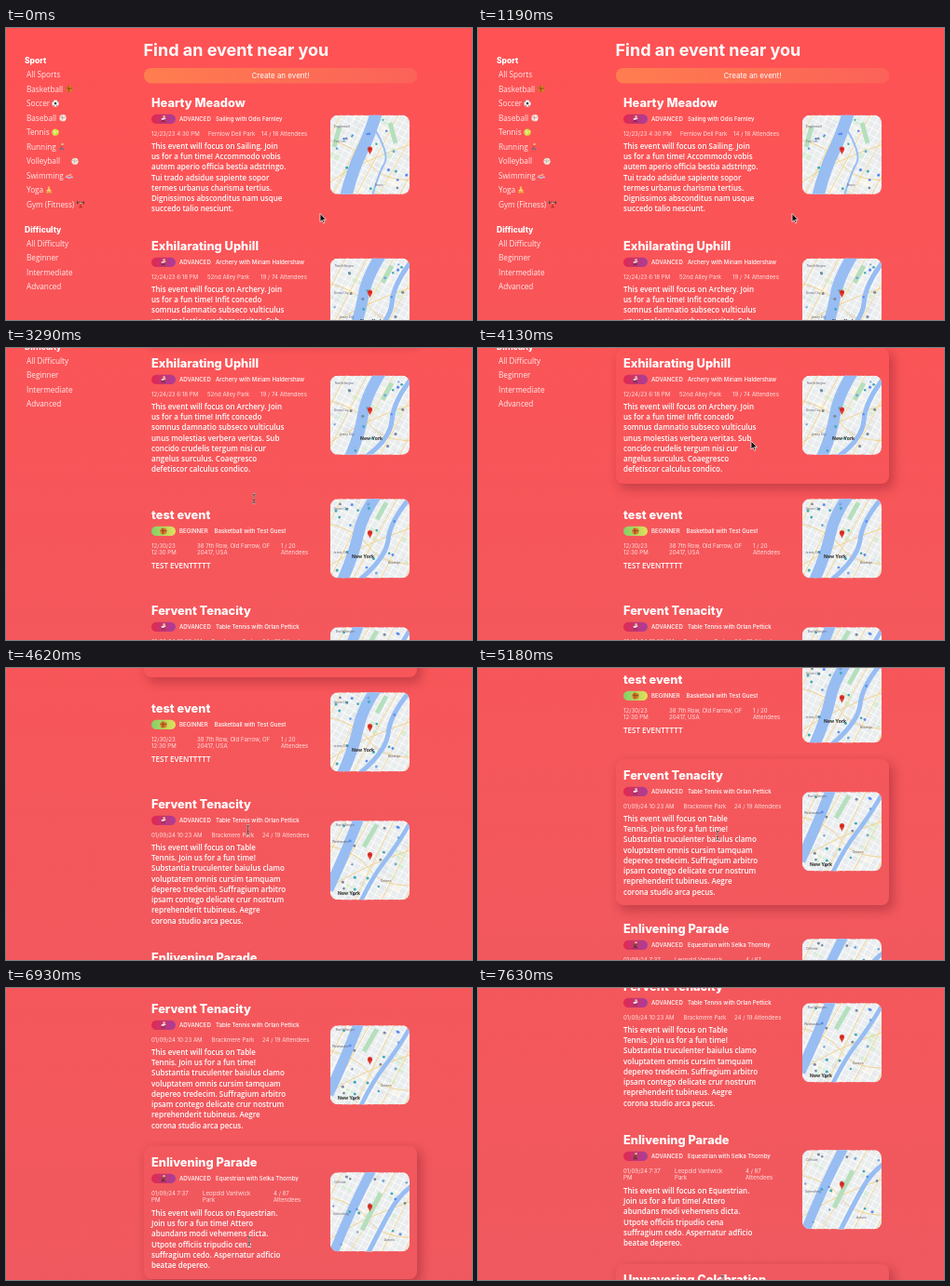
Recreate the animation shown at these times as an HTML page. Size 500 by 314 pixels, loop 7.7 s.

```html
<!DOCTYPE html>
<html lang="en">
<head>
<meta charset="utf-8">
<title>Find an event</title>
<style>
  html, body { margin: 0; width: 100%; height: 100%; overflow: hidden; background: #f5565a; }
  #stage { position: relative; width: 500px; height: 314px; overflow: hidden; }
  #page { position: absolute; left: 0; top: 0; width: 500px; height: 960px;
    background: linear-gradient(#ff5254, #f5575b 470px, #ef595f 820px); }
  .shade { position: absolute; left: 148px; width: 293px; border-radius: 8px; opacity: 0;
    box-shadow: 4px 5px 11px 1px rgba(110, 15, 35, .32); }
  svg { position: absolute; left: 0; top: 0; }
  text { fill: #fff; font-family: Inter, sans-serif; white-space: pre; }
  .h1 { font-size: 18px; font-weight: 700; }
  .h2 { font-size: 12.8px; font-weight: 800; }
  .h3 { font-size: 8.5px; font-weight: 800; }
  .btn { font-size: 8px; }
  .side { font: 8.2px "Open Sans", sans-serif; fill: #ffeceb; }
  .body { font: 600 8px "Open Sans", sans-serif; }
  .meta { font-size: 6.1px; font-weight: 500; }
  .when { font-size: 6.1px; fill: #ffe0df; }
  .city { font: 600 5.6px Roboto, sans-serif; fill: #333; }
  .town { font: 3.4px Roboto, sans-serif; fill: #667; }
</style>
</head>
<body>
<div id="stage">
  <div id="page"></div>
  <svg id="cursor" width="500" height="314">
    <path id="arrow" d="M0 0V9L2.1 7.1 3.6 10.4 5 9.8 3.6 6.6H6.4Z" fill="#111" stroke="#fff" stroke-width=".7"/>
    <g id="beam" fill="none">
      <path d="M-2 -5Q0 -5 0 -3.6Q0 -5 2 -5M0 -4V4M-2 5Q0 5 0 3.6Q0 5 2 5M-1 1.6H1" stroke="#fff" stroke-width="1.9" opacity=".55"/>
      <path d="M-2 -5Q0 -5 0 -3.6Q0 -5 2 -5M0 -4V4M-2 5Q0 5 0 3.6Q0 5 2 5M-1 1.6H1" stroke="#4a3a3e" stroke-width=".9"/>
    </g>
  </svg>
</div>
<script>
const LOOP = 7700;
const $ = id => document.getElementById(id);

const cards = [
  { top: 64, h: 146, t: 80, name: 'Hearty Meadow', level: 'ADVANCED', host: 'Sailing with Odis Farnley',
    when: [[156, '12/23/23 4:30 PM'], [217, 'Fernlow Dell Park'], [274, '14 / 18 Attendees']],
    body: ['This event will focus on Sailing. Join', 'us for a fun time! Accommodo vobis', 'autem aperio officia bestia adstringo.',
      'Tui trado adsidue sapiente sopor', 'termes urbanus charisma tertius.', 'Dignissimos absconditus nam usque', 'succedo talio nesciunt.'],
    map: { water: [['M16 90Q24 58 33 40T50 -5', 13], ['M44 90Q52 62 58 52T46 12', 2]],
      park: 'M44 8L36 40M64 8L70 30M4 34L10 12', towns: [[4, 13, 'Englewood'], [4, 29, 'Fort Lee'], [48, 76, 'Bronx']] } },
  { top: 218, h: 146, t: 234, name: 'Exhilarating Uphill', level: 'ADVANCED', host: 'Archery with Miriam Haldershaw',
    when: [[156, '12/24/23 6:18 PM'], [216, '52nd Alley Park'], [273, '19 / 74 Attendees']],
    body: ['This event will focus on Archery. Join', 'us for a fun time! Infit concedo', 'somnus damnatio subseco vulticulus', 'unus molestias verbera veritas. Sub',
      'concido crudelis tergum nisi cur', 'angelus surculus. Coaegresco', 'defetiscor calculus condico.'],
    map: { water: [['M20 90Q32 62 35 42T55 -5', 12], ['M88 2Q68 26 66 48T34 90', 5]],
      park: 'M56 26L66 8', city: [32, 69], towns: [[9, 64, 'Jersey City'], [5, 9, 'North Bergen'], [4, 38, 'Union City']] } },
  { top: 372, h: 103, t: 397, name: 'test event', level: 'BEGINNER', host: 'Basketball with Test Guest', easy: true,
    when: [[156, '12/30/23', '12:30 PM'], [205, '38 7th Row, Old Farrow, OF', '20417, USA'], [295, '1 / 20', 'Attendees']],
    body: ['TEST EVENTTTTT'],
    map: { water: [['M12 90Q26 58 30 38T50 -5', 12], ['M86 -2Q64 24 62 44T28 90', 5]],
      park: 'M50 22L60 4', city: [23, 64], towns: [[3, 59, 'Jersey City'], [4, 12, 'Union City'], [62, 70, 'Brooklyn']] } },
  { top: 483, h: 157, t: 500, name: 'Fervent Tenacity', level: 'ADVANCED', host: 'Table Tennis with Orlan Pettick',
    when: [[156, '01/09/24 10:23 AM'], [220.5, 'Brackmere Park'], [275, '24 / 19 Attendees']],
    body: ['This event will focus on Table', 'Tennis. Join us for a fun time!', 'Substantia truculenter baiulus clamo', 'voluptatem omnis cursim tamquam',
      'depereo tredecim. Suffragium arbitro', 'ipsam contego delicate crur nostrum', 'reprehenderit tubineus. Aegre', 'corona studio arca pecus.'],
    map: { water: [['M-2 74Q14 40 32 -6', 11], ['M30 92Q44 62 58 44T88 -2', 4.5]],
      park: 'M36 28L50 4', city: [8, 80], towns: [[6, 6, 'North Bergen'], [54, 66, 'Queens'], [2, 24, 'Weehawken']] } },
  { top: 648, h: 143, t: 665, name: 'Enlivening Parade', level: 'ADVANCED', host: 'Equestrian with Selka Thornby',
    when: [[156, '01/09/24 7:37', 'PM'], [211, 'Leopold Vantwick', 'Park'], [287, '4 / 87', 'Attendees']],
    body: ['This event will focus on Equestrian.', 'Join us for a fun time! Attero', 'abundans modi vehemens dicta.', 'Utpote officiis tripudio cena', 'suffragium cedo. Aspernatur adficio', 'beatae depereo.'],
    map: { water: [['M2 90Q20 44 46 -6', 10], ['M38 92Q54 60 64 42T88 14', 5]],
      park: 'M34 62L54 22', towns: [[4, 12, 'Cliffside'], [3, 46, 'Guttenberg'], [58, 74, 'Astoria']] } },
  { top: 799, h: 146, t: 815, name: 'Unwavering Celebration', level: 'ADVANCED', host: '', when: [], body: [] }
];

const text = (x, y, cls, s) => `<text x="${x}" y="${y}" class="${cls}">${s}</text>`;
const path = (d, stroke, w, more = '') => `<path d="${d}" fill="none" stroke="${stroke}" stroke-width="${w}" ${more}/>`;
const dot = (x, y, r, fill) => `<circle cx="${x}" cy="${y}" r="${r}" fill="${fill}"/>`;
const at = (x, y, s) => `<g transform="translate(${x} ${y})">${s}</g>`;

function seeded(n) {
  let s = n * 7919 + 17;
  return () => (s = s * 16807 % 2147483647) / 2147483647;
}

const ball = (fill, line) => dot(0, 0, 3.6, fill) +
  path('M-3.4 -1Q0 1 3.4 -1M-1.2 -3.4Q.8 0 -1.2 3.4', line, .6);
const soccer = dot(0, 0, 3.6, '#f4f4f4') + dot(0, 0, 1.3, '#444') +
  path('M-3 -1.8L-2 -2.4M3 -1.8L2 -2.4M-2 2.8L-1.2 2M2 2.8L1.2 2', '#444', 1);
const figure = (shirt, legs) => dot(.6, -2.7, 1.2, '#f0b77c') +
  path('M0 -1.4L-.4 1M-2.2 0L2.2 -1', shirt, 1.5) + path('M-.4 1L-2 3.4M-.4 1L1.8 3.4', legs, 1.1);
const swimmer = dot(1.2, -1, 1.1, '#f0b77c') + path('M-3.4 .4L.4 -.6', '#e9c9a8', 1.2) +
  path('M-4 2Q-2.7 .8 -1.4 2T1.2 2T3.8 2', '#b9c8ee', 1.3);
const yoga = dot(0, -2.7, 1.2, '#f5c04e') + path('M0 -1.4V1.6M-2.4 1L0 -1L2.4 1', '#f2d36a', 1.4) +
  path('M-3 2.8Q0 1.4 3 2.8', '#e8a93d', 1.3);
const lifter = dot(0, -1.8, 1.1, '#e9b37e') + path('M0 -.6V1.4L-1.4 3.6M0 1.4L1.4 3.6', '#b8372f', 1.3) +
  path('M-3.6 -2.4H3.6', '#555', .7) + path('M-3.4 -3.8V-.8M3.4 -3.8V-.8', '#444', 1.2);

const sports = [['All Sports'], ['Basketball', 68, ball('#d9792b', '#6b3510')], ['Soccer', 53, soccer],
  ['Baseball', 61, ball('#f1ece8', '#c9766a')], ['Tennis', 53, ball('#d3dd3f', '#f6f8cf')],
  ['Running', 60, figure('#d8584a', '#5b6a8a')], ['Volleyball', 74, ball('#efe6d8', '#b5a28c')],
  ['Swimming', 68, swimmer], ['Yoga', 46, yoga], ['Gym (Fitness)', 80, lifter]];
const levels = [['All Difficulty'], ['Beginner'], ['Intermediate'], ['Advanced']];

const menu = (y, title, items) => text(20, y + 3, 'h3', title) + items.map(([s, x, icon], i) => {
  const cy = y + 15 + i * 15.55;
  return text(22, cy + 3, 'side', s) + (icon ? at(x, cy, icon) : '');
}).join('');

function drawMap(m, n) {
  const rnd = seeded(n + 1), pick = a => a[Math.floor(rnd() * a.length)];
  const tilt = 'transform="rotate(28 42 42)"';
  let s = '<rect width="85" height="85" fill="#eaedee"/>';
  for (let i = 0; i < 26; i++)
    s += `<rect x="${rnd() * 85}" y="${rnd() * 85}" width="${4 + rnd() * 9}" height="${3 + rnd() * 6}" fill="${pick(['#e1e5e8', '#f6f3ea', '#d9ecd9', '#e6e8ec'])}" ${tilt}/>`;
  let grid = '', main = '';
  for (let i = -40; i < 130; i += 7) grid += `M${i} -40V125M-40 ${i}H125`;
  for (let i = -30; i < 120; i += 24) main += `M${i + rnd() * 8} -40L${i + rnd() * 10} 125`;
  s += path(grid, '#fff', .7, tilt);
  s += path(main, '#f5d68c', .8, tilt);
  s += path('M-4 26Q30 34 42 52T90 70M-4 74Q30 50 90 30', '#f3cd78', .8);
  s += path(m.park, '#b5dfbd', 5);
  for (const [d, w] of m.water) s += path(d, '#97bdf3', w);
  for (let i = 0; i < 18; i++)
    s += dot(3 + rnd() * 79, 4 + rnd() * 77, 1.1 + rnd() * .5, pick(['#3fa9b5', '#5b8def', '#45a9b8', '#6fa8dc', '#7d8aa0']));
  for (const [x, y, name] of m.towns) s += text(x, y, 'town', name);
  if (m.city) s += text(...m.city, 'city', 'New York');
  s += `<path d="M42.5 42.5C42 39.6 39.8 38.8 39.8 36.4A2.7 2.7 0 0 1 45.2 36.4C45.2 38.8 43 39.6 42.5 42.5Z" fill="#e5392f"/>` + dot(42.5, 36.4, .9, '#8c1a16');
  return `<g clip-path="url(#round)">${s}</g>`;
}

const pillIcon = [figure('#f3e3e3', '#6a2a3a'), figure('#e9d6c2', '#5a3148'), ball('#d9792b', '#6b3510'),
  figure('#f5e9e9', '#8a3550'), figure('#7a4a35', '#4c2c26'), ''];

function drawCard(c, i) {
  const { t } = c, two = c.when.some(w => w[2]);
  let s = text(156, t + 4.6, 'h2', c.name) +
    `<rect x="156" y="${t + 12.7}" width="26" height="10.4" rx="5.2" fill="url(#${c.easy ? 'easy' : 'hard'})"/>` +
    at(169, t + 18, pillIcon[i]) +
    text(186, t + 20.2, 'meta', c.level) + text(c.easy ? 223.5 : 225, t + 20.2, 'meta', c.host);
  for (const [x, a, b] of c.when)
    s += text(x, t + (two ? 35.6 : 36.2), 'when', a) + (b ? text(x, t + 43.4, 'when', b) : '');
  c.body.forEach((line, k) => s += text(156, t + (two ? 57.8 : 49.8) + k * 11.25, 'body', line));
  if (c.map) s += at(348, c.top + c.h / 2 - 43.2, drawMap(c.map, i));
  return s;
}

const ramp = (id, a, b) => `<linearGradient id="${id}"><stop stop-color="${a}"/><stop offset="1" stop-color="${b}"/></linearGradient>`;

$('page').innerHTML =
  cards.map(c => `<div class="shade" style="top:${c.top}px;height:${c.h}px"></div>`).join('') +
  `<svg width="500" height="960"><defs>${ramp('hard', '#e2294f', '#a83f9c')}${ramp('easy', '#7fd068', '#e6df5a')}${ramp('cta', '#ff7d4f', '#fb6259')}
  <clipPath id="round"><rect width="85" height="85" rx="8"/></clipPath></defs>` +
  menu(35, 'Sport', sports) + menu(216.5, 'Difficulty', levels) +
  text(147.5, 30.4, 'h1', 'Find an event near you') +
  '<rect x="148" y="43" width="293" height="16.5" rx="8" fill="url(#cta)"/>' +
  '<text x="294.5" y="54" class="btn" text-anchor="middle">Create an event!</text>' +
  cards.map(drawCard).join('') + '</svg>';

const shades = [...document.querySelectorAll('.shade')];
const clamp = v => Math.max(0, Math.min(1, v));
const easeOut = p => 1 - (1 - p) ** 3;
const smooth = p => p * p * (3 - 2 * p);

// start, end, distance
const scrolls = [[2450, 3200, 218], [4300, 5050, 167], [5350, 6120, 90], [6900, 7690, 27]];
// hover start and end for each card
const hovers = [[1820, 3270], [3580, 4620], null, [4800, 5700], [5880, 7200], [7330, 9000]];
// start, end, x, y
const moves = [[1720, 2180, 266, 162], [3400, 3760, 293, 100], [4220, 4700, 257, 180], [5400, 5900, 261, 272], [6900, 7400, 262, 314]];

function render(t) {
  let y = 0;
  for (const [a, b, d] of scrolls) y += d * easeOut(clamp((t - a) / (b - a)));
  $('page').style.transform = `translateY(${-Math.round(y)}px)`;

  hovers.forEach((h, i) => {
    if (h) shades[i].style.opacity = smooth(clamp((t - h[0]) / 250)) * (1 - smooth(clamp((t - h[1]) / 250)));
  });

  let cx = 337, cy = 199.5;
  for (const [a, b, x, yy] of moves) {
    const p = smooth(clamp((t - a) / (b - a)));
    cx += (x - cx) * p;
    cy += (yy - cy) * p;
  }
  const beam = (t > 1950 && t < 3520) || t > 4450;
  $('arrow').style.display = beam ? 'none' : '';
  $('beam').style.display = beam ? '' : 'none';
  $(beam ? 'beam' : 'arrow').setAttribute('transform', `translate(${cx} ${cy})`);
}

const start = performance.now();
function tick() {
  const t = (performance.now() - start) % LOOP;
  render(Math.floor(t / 70) * 70);
  requestAnimationFrame(tick);
}
tick();
</script>
</body>
</html>
```
